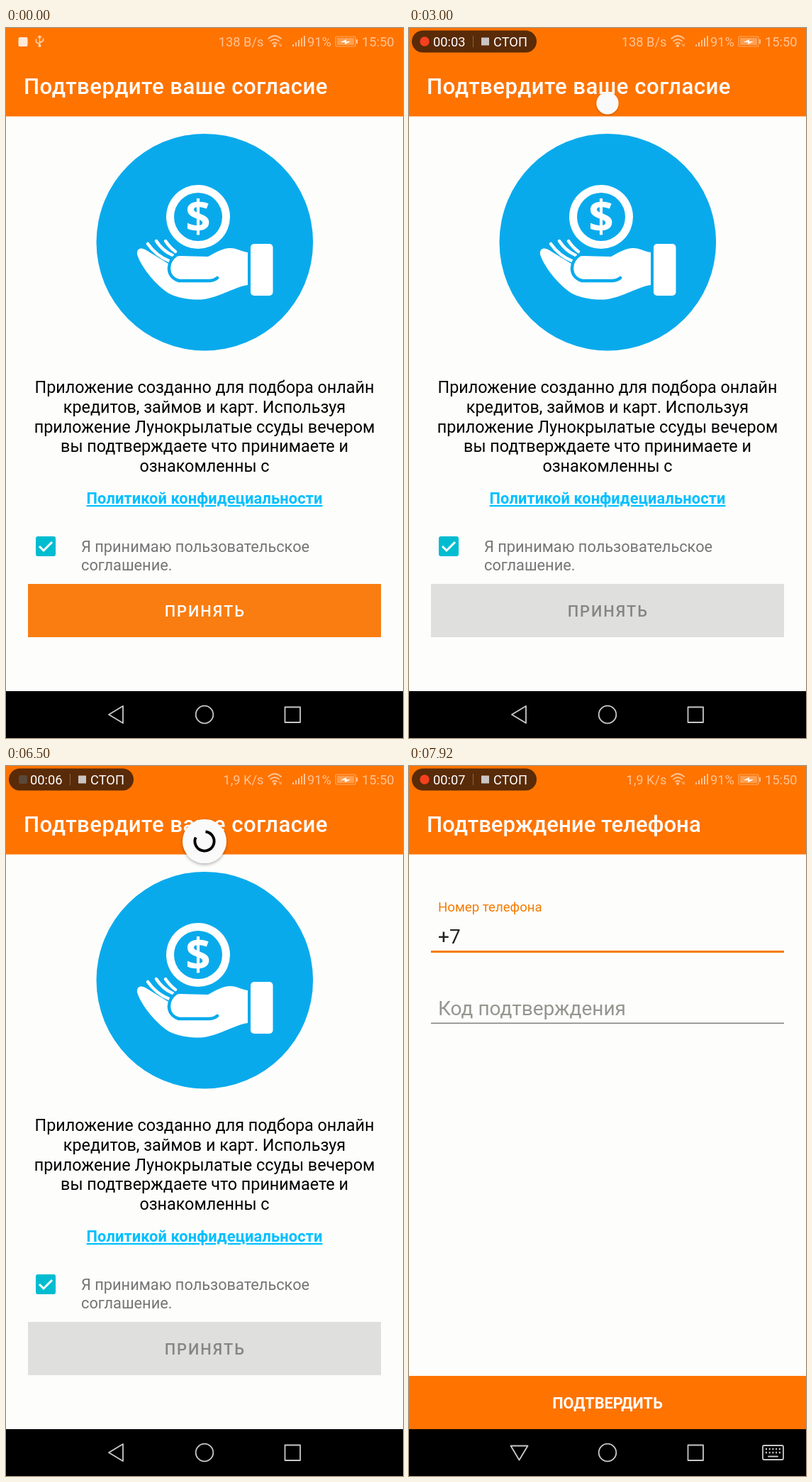
These frames come from a looping animation (560 by 1000 pixels, 8000 ms). An HTML page:

```html
<!DOCTYPE html>
<html lang="ru">
<head>
<meta charset="utf-8">
<style>
  html, body { margin: 0; width: 100%; height: 100%; overflow: hidden; background: #fdfdfc; }
  svg { display: block; width: 560px; height: 1000px; font-family: Roboto, sans-serif; }
  .title { font-size: 31.1px; font-weight: 500; fill: #fff; }
  .body { font-size: 23.33px; text-anchor: middle; }
  .small { font-size: 21.78px; }
  .mid { text-anchor: middle; }
  .status { font-size: 18.3px; }
  .input { font-size: 28px; }
  .line { fill: none; stroke-linecap: round; stroke-linejoin: round; }
</style>
</head>
<body>
<svg viewBox="0 0 560 1000">
  <defs>
    <filter id="shadow" x="-30%" y="-30%" width="160%" height="160%">
      <feDropShadow dx="0" dy="2" stdDeviation="2" flood-opacity=".3"/>
    </filter>
  </defs>

  <!-- consent screen -->
  <rect width="560" height="1000" fill="#fdfdfc"/>
  <rect width="560" height="124.500" fill="#ff7300"/>
  <text class="title" x="25" y="93" letter-spacing=".0155em">Подтвердите ваше согласие</text>
  <circle cx="280.300" cy="301.700" r="152.800" fill="#09aaec"/>
  <g fill="#fff">
    <circle cx="271" cy="266" r="45"/>
    <circle cx="271" cy="266" r="34" fill="#09aaec"/>
    <text class="mid" x="271" y="288" font-family="Open Sans, sans-serif" font-size="62" font-weight="700">$</text>
    <rect x="345" y="304" width="31.500" height="73" rx="5"/>
    <path d="M185 319C184 309 192 309 198 313L229 332C232 324 238 321 246 321L285 322C296 316 306 310 316 310C326 310 333 315 341 316V362C325 364 300 379 280 382C262 384 242 380 230 374C214 364 192 340 185 319Z"/>
  </g>
  <g class="line" stroke="#fff" stroke-width="4.500">
    <path d="M200 304Q212 321 230 328M212 300Q221 314 235 320M225 300Q231 309 239 315"/>
  </g>
  <path class="line" stroke="#09aaec" stroke-width="4.500" d="M240 320C226 330 226 351 244 356H286Q293 356 298 352"/>

  <g id="intro" class="body"></g>
  <text class="small mid" x="280" y="670" font-weight="700" letter-spacing=".15" fill="#00bfff" text-decoration="underline">Политикой конфидециальности</text>
  <rect x="42" y="716" width="28" height="28" rx="3" fill="#00bcd0"/>
  <path d="M47 730l6 6 12-12" fill="none" stroke="#fff" stroke-width="3"/>
  <g class="small" fill="#757575">
    <text x="106" y="738">Я принимаю пользовательское</text>
    <text x="106" y="764">соглашение.</text>
  </g>
  <rect id="accept" x="31" y="783" width="498" height="75"/>
  <text id="acceptText" class="small" x="223.700" y="829" font-weight="500" letter-spacing="1.94">ПРИНЯТЬ</text>

  <g id="spinner">
    <circle r="31" fill="#fafafa" filter="url(#shadow)"/>
    <path id="arc" fill="none" stroke="#000" stroke-width="3.9"/>
  </g>

  <!-- phone screen -->
  <g id="phone">
    <rect width="560" height="1000" fill="#fdfdfc"/>
    <rect width="560" height="124.500" fill="#ff7300"/>
    <text class="title" x="25" y="93">Подтверждение телефона</text>
    <text x="41" y="205" font-size="18.67" fill="#f57c00">Номер телефона</text>
    <text class="input" x="41" y="250" fill="#212121">+7</text>
    <rect id="caret" x="40.5" y="221" width="3" height="38" fill="#f57c00"/>
    <rect x="31" y="260" width="498" height="3" fill="#f57c00"/>
    <text class="input" x="41" y="351" fill="#96968f">Код подтверждения</text>
    <rect x="31" y="361.5" width="498" height="1.6" fill="#858585"/>
    <rect y="859" width="560" height="76" fill="#ff7300"/>
    <text class="small mid" x="280" y="905" font-weight="700" fill="#fff">ПОДТВЕРДИТЬ</text>
  </g>

  <!-- status bar -->
  <g class="status" fill="#ffc494">
    <text id="speed" x="363.5" y="26" text-anchor="end"></text>
    <text x="425" y="26">91%</text>
    <text x="502" y="26">15:50</text>
    <path d="M404 26h2v-3h-2zM408 26h2v-6h-2zM412 26h2v-9h-2zM416 26h2v-12h-2zM420 26h2v-15h-2z"/>
    <rect x="467" y="14" width="24" height="10" opacity=".55"/>
    <path d="M494 16h2v6h-2z"/>
    <path d="M472 20l8-4v3h6l-8 4v-3z" fill="#fff"/>
    <circle cx="379" cy="25" r="2"/>
    <path d="M385 22l2 4M388 22v4" stroke="#ffc494"/>
    <g class="line" stroke="#ffc494" stroke-width="1.800">
      <path d="M370 15q9-8 18 0M373 18.500q6-5 12 0M376 22q3-2.500 6 0"/>
      <rect x="465" y="12" width="28" height="14" rx="1.500" stroke-width="1.200" opacity=".7"/>
    </g>
  </g>
  <g id="notices">
    <rect x="17.500" y="13" width="13" height="13" rx="2" fill="#ffe9d8"/>
    <g class="line" stroke="#ffd0a8" stroke-width="1.600">
      <path d="M47.500 12v13M42.500 16v4l5 3M52.500 15v3l-5 3M45.500 13l2-2 2 2"/>
      <circle cx="47.500" cy="25" r="1.300"/>
    </g>
  </g>
  <g id="recorder" class="status" fill="#fff">
    <rect x="4" y="3.500" width="176" height="31" rx="15.500" fill="#592b08"/>
    <circle id="on" cx="22" cy="19" r="6.700" fill="#f6401f"/>
    <rect id="off" x="18" y="13" width="12" height="12" rx="2" fill="#5c483a"/>
    <text id="clock" x="34" y="26"></text>
    <rect x="90" y="11" width="1" height="16" fill="#8a6549"/>
    <rect x="102" y="13.500" width="11" height="11" fill="#c9c5c3"/>
    <text x="119" y="26">СТОП</text>
  </g>

  <!-- navigation bar -->
  <rect y="934" width="560" height="66"/>
  <g class="line" stroke="#c8c8c8" stroke-width="1.800">
    <path id="back"/>
    <circle cx="280" cy="967" r="12.300"/>
    <rect x="393.500" y="956.500" width="21.500" height="21.500"/>
    <g id="keyboard">
      <rect x="499" y="957" width="29" height="20" rx="2"/>
      <path d="M503 962h21M503 967h21" stroke-dasharray="2 2.700" stroke-linecap="butt" stroke-width="2.500"/>
      <path d="M507 972.500h13"/>
    </g>
  </g>
</svg>
<script>
const LOOP = 8000, GROW = 2800, SPIN = 3200, SHRINK = 7000, SWITCH = 7420;
const CYCLE = 1332;
const $ = id => document.getElementById(id);
const set = (id, attrs) => {
  for (const name in attrs) $(id).setAttribute(name, attrs[name]);
};
const show = (id, visible) => set(id, { visibility: visible ? 'visible' : 'hidden' });
const clamp = x => Math.min(1, Math.max(0, x));

const intro = [
  'Приложение созданно для подбора онлайн',
  'кредитов, займов и карт. Используя',
  'приложение Лунокрылатые ссуды вечером',
  'вы подтверждаете что принимаете и',
  'ознакомленны с'
];
$('intro').innerHTML = intro.map((line, i) =>
  `<text x="280" y="${514 + i * 27.75}">${line}</text>`).join('');

// cubic-bezier(.4, 0, .2, 1)
function fastOutSlowIn(x) {
  let lo = 0, hi = 1;
  for (let i = 0; i < 20; i++) {
    const u = (lo + hi) / 2, v = 1 - u;
    if (1.2 * v * v * u + 0.6 * v * u * u + u ** 3 < x) lo = u; else hi = u;
  }
  return lo * lo * (3 - 2 * lo);
}

function drawSpinner(t) {
  const grow = 0.5 - Math.cos(clamp((t - GROW) / 400) * Math.PI) / 2;
  const scale = grow * (1 - clamp((t - SHRINK) / 160));
  show('spinner', scale > 0);
  set('spinner', { transform: `translate(280 106) scale(${scale})` });
  show('arc', scale > 0 && t > SPIN);

  const turns = Math.max(0, t - SPIN) / CYCLE, p = turns % 1;
  const length = 0.01 + 0.79 * (p < 0.5 ? fastOutSlowIn(p * 2) : 1 - fastOutSlowIn(p * 2 - 1));
  const tail = Math.floor(turns) * 0.79 + (p < 0.5 ? 0 : 0.8 - length);
  const from = (tail + turns * 0.81 + 0.18) * 2 * Math.PI;
  const to = from + length * 2 * Math.PI;
  const point = a => `${13.6 * Math.cos(a)} ${13.6 * Math.sin(a)}`;
  set('arc', { d: `M${point(from)}A13.6 13.6 0 ${+(length > 0.5)} 1 ${point(to)}` });
}

function draw(t) {
  const recorded = t < 3500 ? t : t - 90;
  const lit = (recorded + 960) % 1000 >= 460;
  show('notices', t < 80);
  set('recorder', { display: t < 80 ? 'none' : 'inline' });
  set('on', { opacity: +lit });
  set('off', { opacity: +!lit });
  $('clock').textContent = '00:0' + Math.floor((recorded + 80) / 1000);
  $('speed').textContent = t < 3500 ? '138 B/s' : t < 6500 ? '244 B/s' : '1,9 K/s';

  const disabled = t >= 2750 && t < SWITCH;
  set('accept', { fill: disabled ? '#dfdfdd' : '#f97d11' });
  set('acceptText', { fill: disabled ? '#858585' : '#fff' });
  drawSpinner(t);

  const left = (1 - clamp((t - SWITCH) / 200)) ** 2;
  set('phone', {
    display: t < SWITCH ? 'none' : 'inline',
    transform: `translate(${19.5 * left} 0)`,
    opacity: 1 - 0.26 * left
  });
  set('caret', { opacity: +(t < 7900) });
  const typing = t >= 7660;
  set('back', { d: typing ? 'M143.500 957.500h24l-12 20z' : 'M145 967l20-12v24z' });
  show('keyboard', typing);
}

const start = performance.now();
function frame() {
  draw((performance.now() - start) % LOOP);
  requestAnimationFrame(frame);
}
frame();
</script>
</body>
</html>
```
